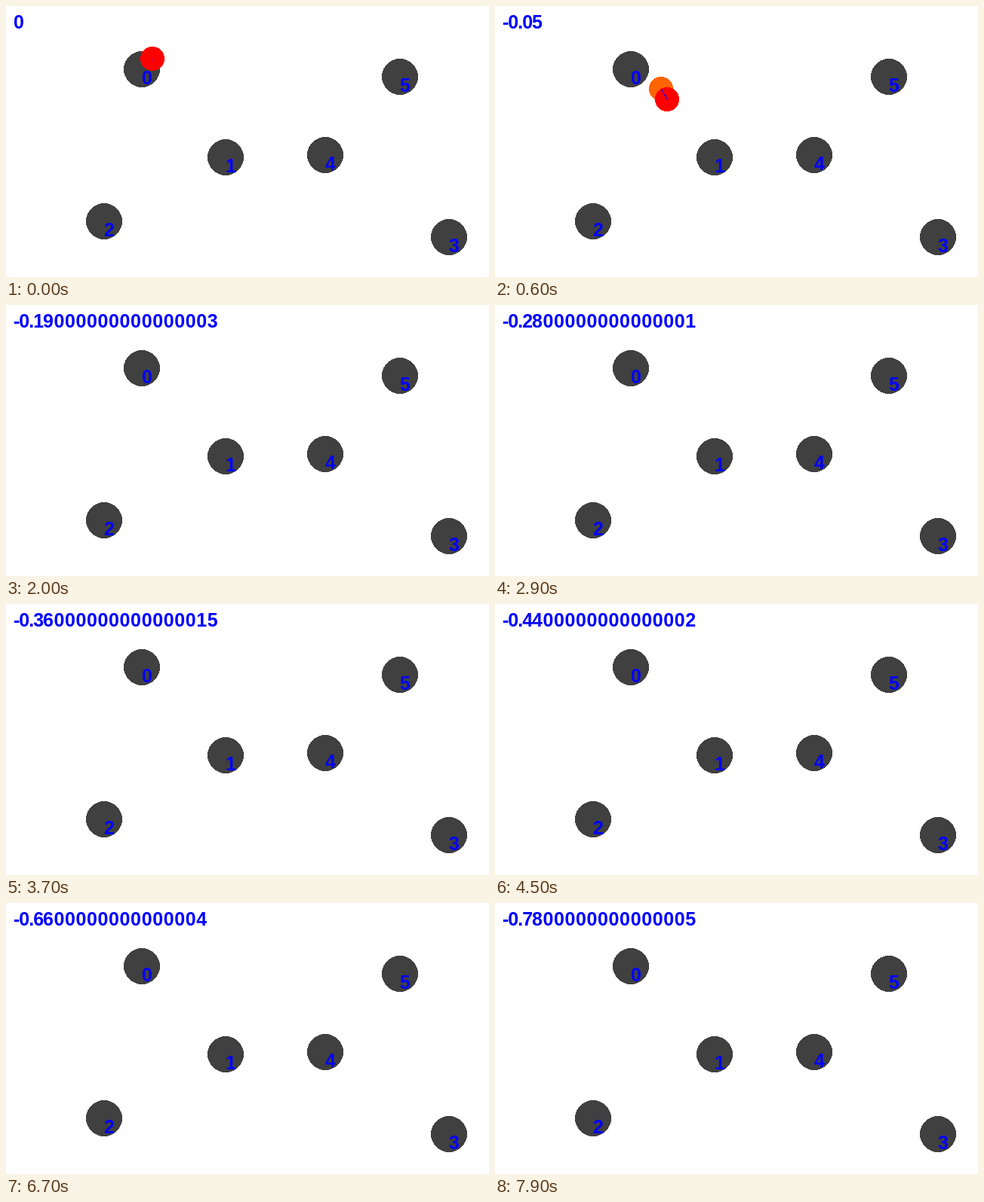
Write an HTML page that moves like this. It is 640 by 360 pixels and loops after 8000 ms.

```html
<!DOCTYPE html>
<html lang="en">
<head>
<meta charset="utf-8">
<title>Checkpoint run</title>
<style>
  html, body { margin: 0; width: 100%; height: 100%; overflow: hidden; background: #fff; }
  svg { display: block; width: 100vw; height: 100vh; }
  circle, line { shape-rendering: crispEdges; }
  text { font: bold 25px "Liberation Sans", Arial, sans-serif; fill: #00f; white-space: pre; }
  #head { letter-spacing: -1px; }
  #tail { letter-spacing: .6px; }
</style>
</head>
<body>
<svg viewBox="0 0 640 360">
  <g id="checkpoints"></g>
  <circle id="previous" r="16" fill="#ff6400"/>
  <circle id="current" r="16" fill="#f00"/>
  <line id="track" stroke="#00f" stroke-linecap="square"/>
  <text x="10" y="30"><tspan id="head"></tspan><tspan id="tail"></tspan></text>
</svg>
<script>
  const STEP = 100, STEPS = 80;
  const START = [194, 70], FIRST_THRUST = [2.54, 2.75], THRUST = [1.94, 3.496];
  const DRAG = 0.85, PENALTY = 0.01;
  const CHECKPOINTS = [[180, 84], [291, 201], [130, 286], [587, 307], [423, 198], [522, 94]];

  const byId = id => document.getElementById(id);
  const setAttrs = (el, attrs) => {
    for (const name in attrs) el.setAttribute(name, attrs[name]);
  };

  byId("checkpoints").innerHTML = CHECKPOINTS.map(([x, y], i) =>
    `<circle cx="${x}" cy="${y}" r="24" fill="#404040"/><text x="${x}" y="${y + 20}">${i}</text>`
  ).join("");

  // Thrust adds to the velocity, the pod moves, then drag slows it.
  function podAt(step) {
    return START.map((start, axis) => {
      let position = start, velocity = 0;
      for (let i = 0; i < step; i++) {
        velocity += (i ? THRUST : FIRST_THRUST)[axis];
        position += velocity;
        velocity *= DRAG;
      }
      return Math.round(position);
    });
  }

  // Repeated subtraction keeps the floating point drift visible.
  function scoreAt(step) {
    let score = 0;
    for (let i = 1; i < step; i++) score -= PENALTY;
    return String(score);
  }

  function render(time) {
    const step = Math.floor(time / STEP) % STEPS;
    const [x1, y1] = podAt(Math.max(0, step - 1));
    const [x2, y2] = podAt(step);
    setAttrs(byId("previous"), { cx: x1, cy: y1 });
    setAttrs(byId("current"), { cx: x2, cy: y2 });
    setAttrs(byId("track"), { x1: x1 + .5, y1: y1 + .5, x2: x2 + .5, y2: y2 + .5 });
    const score = scoreAt(step);
    byId("head").textContent = score.slice(0, 4);
    byId("tail").textContent = score.slice(4);
  }

  const began = performance.now();
  function tick() {
    render(performance.now() - began);
    requestAnimationFrame(tick);
  }
  tick();
</script>
</body>
</html>
```
